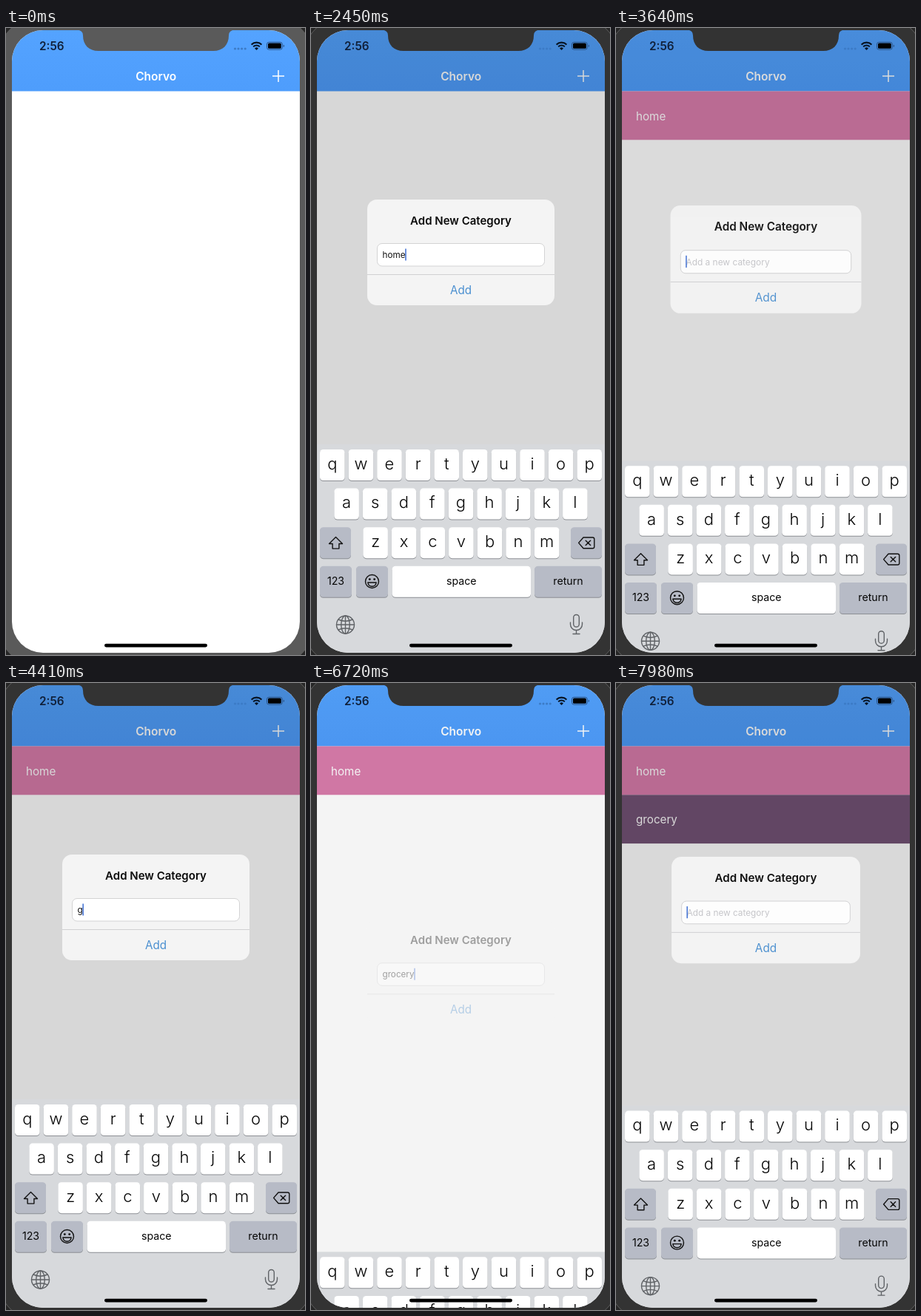
Write an HTML page that moves like this. It is 404 px wide and 848 px high and loops after 8000 ms.

```html
<!DOCTYPE html>
<html lang="en">
<head>
<meta charset="utf-8">
<title>To-do list</title>
<style>
  html, body { margin: 0; width: 100%; height: 100%; overflow: hidden; background: #262626; }
  svg { display: block; width: 404px; height: 848px; font-family: Inter, "Liberation Sans", sans-serif; }
  .mid { text-anchor: middle; }
  .line { fill: none; stroke-linecap: round; stroke-linejoin: round; }
</style>
</head>
<body>
<svg viewBox="0 0 404 848" xmlns="http://www.w3.org/2000/svg">
  <defs>
    <clipPath id="bodyClip"><rect x="-12" y="-17" width="429" height="882" rx="62"/></clipPath>
    <clipPath id="screenClip"><rect x="8" y="3" width="389" height="842" rx="42"/></clipPath>
    <linearGradient id="bar" x1="0" y1="0" x2="0" y2="1">
      <stop offset="0" stop-color="#54a3ff"/><stop offset="1" stop-color="#4e9dfc"/>
    </linearGradient>
  </defs>

  <g clip-path="url(#bodyClip)">
    <rect width="404" height="848" fill="#5a5a5a"/>
    <rect id="leftDark" width="64" height="848" fill="#333"/>
    <rect id="rightDark" x="64" width="340" height="848" fill="#333"/>
  </g>
  <rect x="-12" y="-17" width="429" height="882" rx="62" fill="none" stroke="#666" stroke-width=".8"/>

  <g clip-path="url(#screenClip)">
    <rect x="8" y="3" width="389" height="842" fill="#fff"/>
    <rect x="8" y="3" width="389" height="82.5" fill="url(#bar)"/>
    <text class="mid" x="202.7" y="70.5" font-size="15.5" font-weight="600" fill="#fff">Chorvo</text>
    <path id="plus" d="M360 65h16M368 57v16" stroke="#fff" stroke-width="1.5"/>
    <g id="rows" font-size="15.2" fill="#fff"></g>

    <rect id="dim" x="8" y="3" width="389" height="842" fill="#000"/>

    <text x="45" y="29.5" font-size="15.3" font-weight="600" fill="#10203a">2:56</text>
    <g fill="#3c7bc6">
      <circle cx="309.5" cy="28" r="1.6"/><circle cx="314" cy="28" r="1.6"/>
      <circle cx="318.6" cy="28" r="1.6"/><circle cx="323.2" cy="28" r="1.6"/>
    </g>
    <path d="M331.6 22.4a10 10 0 0 1 13.8 0M334.2 25.2a6.3 6.3 0 0 1 8.6 0" fill="none" stroke="#071322" stroke-width="2.1"/>
    <path d="M338.5 29.9l-2.5-2.5a3.6 3.6 0 0 1 5 0z" fill="#071322"/>
    <rect x="352.5" y="19.2" width="20.8" height="10" rx="2.8" fill="none" stroke="#2b5488"/>
    <rect x="354" y="20.6" width="17.8" height="7.2" rx="1.5" fill="#000"/>
    <path d="M374.8 22.4v3.6q1.3-.6 1.3-1.8t-1.3-1.8z" fill="#2b5488"/>

    <g id="alert">
      <rect x="76" y="232" width="253" height="143" rx="13" fill="#f4f4f4"/>
      <text class="mid" x="202.5" y="265.5" font-size="15" font-weight="600" fill="#0a0a0a">Add New Category</text>
      <rect x="89.5" y="291.5" width="226" height="30.5" rx="6.5" fill="#fff" stroke="#c9c9cb" stroke-width=".8"/>
      <text id="hint" x="96.5" y="311" font-size="11.7" fill="#c5c5c9">Add a new category</text>
      <text id="entry" x="96.5" y="311" font-size="11.7" fill="#111"></text>
      <rect id="caret" y="298.5" width="1.6" height="16" fill="#4876d6"/>
      <path d="M76 333.5h253" stroke="#cdcdcf" stroke-width=".9"/>
      <text class="mid" x="202.5" y="360" font-size="15.2" fill="#4a8fd0">Add</text>
    </g>

    <g id="keyboard">
      <rect x="8" y="563" width="389" height="300" fill="#d7d9dc"/>
      <g id="keys" fill="#050505"></g>
      <g class="line" stroke="#111" stroke-width="1.4">
        <path d="M33.5 688.5l9 9h-4.6v6.6h-8.8v-6.6h-4.6z"/>
        <path d="M368 689h12.6q2.2 0 2.2 2.2v10.4q0 2.2-2.2 2.2H368l-6.4-7.4zM371.2 693.2l6.4 6.4M377.6 693.2l-6.4 6.4"/>
        <circle cx="82.5" cy="748.5" r="9"/>
        <path d="M76.8 750h11.4q-.9 5.2-5.7 5.2t-5.7-5.2z"/>
      </g>
      <circle cx="79.3" cy="745.6" r="1.4"/><circle cx="85.7" cy="745.6" r="1.4"/>
      <g class="line" stroke="#606367" stroke-width="1.4">
        <circle cx="46.5" cy="807" r="12"/>
        <ellipse cx="46.5" cy="807" rx="5.8" ry="12"/>
        <path d="M46.5 795v24M34.5 807h24M37 800q9.500 4.400 19 0M37 814q9.500-4.400 19 0"/>
        <rect x="354.700" y="793.500" width="7.600" height="16.500" rx="3.800"/>
        <path d="M350.500 804v2.500a8 8 0 0 0 16 0V804M358.500 814.500v5M354 819.500h9"/>
      </g>
    </g>

    <rect x="133" y="832.700" width="139" height="4.800" rx="2.400" fill="#000"/>
  </g>
  <path id="notch" d="M96 2.500Q104 3 104 10C104 23 112 31 125 31H280C293 31 301 23 301 10Q301 3 309 2.500z"/>
</svg>

<script>
const LOOP = 8000, TICK = 70;
const $ = id => document.getElementById(id);
const clamp = v => Math.max(0, Math.min(1, v));

function add(parent, tag, attrs, text = '') {
  const el = document.createElementNS('http://www.w3.org/2000/svg', tag);
  for (const k in attrs) el.setAttribute(k, attrs[k]);
  el.textContent = text;
  parent.append(el);
  return el;
}

// Keyboard
function key(x, y, width, label, special) {
  const box = { x, width, height: 42, rx: 4.6 };
  add($('keys'), 'rect', { ...box, y: y + 1, fill: '#8c8f94' });
  add($('keys'), 'rect', { ...box, y, fill: special ? '#b7bbc6' : '#fff' });
  const letter = label.length === 1;
  add($('keys'), 'text', {
    x: x + width / 2, y: y + (letter ? 26.8 : 25.3), class: 'mid',
    'font-size': letter ? 22 : 14.2, 'font-weight': letter ? 300 : 400
  }, label);
}
[['qwertyuiop', 12], ['asdfghjkl', 31.3], ['zxcvbnm', 70.3]].forEach(([letters, x], row) =>
  [...letters].forEach((c, i) => key(x + i * 38.6, 570 + row * 52.6, 33.6, c)));
key(12, 675.2, 42, '', true);
key(351, 675.2, 42, '', true);
key(12, 727.8, 43, '123', true);
key(61, 727.8, 43, '', true);
key(109.5, 727.8, 187.5, 'space');
key(302, 727.8, 91, 'return', true);

// Table rows appear when the dialog has gone
const rows = [['home', '#d97cab', 2870], ['grocery', '#735275', 7000]].map(([name, fill, at], i) => {
  const g = add($('rows'), 'g', { transform: `translate(0 ${85.5 + i * 65.8})` });
  add(g, 'rect', { x: 8, width: 389, height: 65.8, fill });
  add(g, 'text', { x: 27, y: 39 }, name);
  return { g, at };
});

const sessions = [
  { press: 770, open: 1089, close: 2480, word: 'home', typed: [1750, 1890, 2170, 2240] },
  { press: 3150, open: 3410, close: 6580, word: 'grocery', typed: [4340, 4550, 5110, 5250, 5390, 5950, 6160] },
  { press: 7490, open: 7687, close: Infinity, word: '', typed: [] }
];

// Critically damped spring: what is left of the way, from 1 to 0
function remaining(ms) {
  const x = Math.max(0, ms) * 0.01826;
  return (1 + x) * Math.exp(-x);
}

function draw(t) {
  const s = sessions.filter(s => t >= s.press).pop() || sessions[0];
  const closing = t >= s.close;
  const away = closing ? 1 - remaining(t - s.close) : remaining(t - s.open);
  const shown = closing ? clamp(1 - (t - s.close) / 220) : 1 - away;
  const scale = closing ? 1 : 1 + 0.25 * away;

  const pressed = t >= s.press && t < s.open;
  $('plus').setAttribute('opacity', pressed ? 0.4 : 1);
  $('dim').setAttribute('opacity', 0.155 * (1 - away));
  $('keyboard').setAttribute('transform', `translate(0 ${285 * away})`);
  $('alert').setAttribute('opacity', shown);
  $('alert').setAttribute('transform',
    `translate(202.5 ${303.5 + 120.5 * away}) scale(${scale}) translate(-202.5 -303.5)`);

  const text = s.word.slice(0, s.typed.filter(at => t >= at).length);
  $('entry').textContent = text;
  $('hint').style.display = text ? 'none' : '';
  $('caret').setAttribute('x', 96.2 + (text ? $('entry').getComputedTextLength() : 0));

  rows.forEach(r => r.g.style.display = t >= r.at ? '' : 'none');

  const focus = clamp(t / 280);
  const tone = Math.round(90 - 39 * focus);
  $('rightDark').setAttribute('opacity', focus);
  $('leftDark').setAttribute('opacity', t >= 770 ? 1 : 0);
  $('notch').setAttribute('fill', `rgb(${tone},${tone},${tone})`);
}

const start = performance.now();
function frame() {
  const t = (performance.now() - start) % LOOP;
  draw(Math.floor(t / TICK) * TICK);
  requestAnimationFrame(frame);
}
frame();
</script>
</body>
</html>
```
